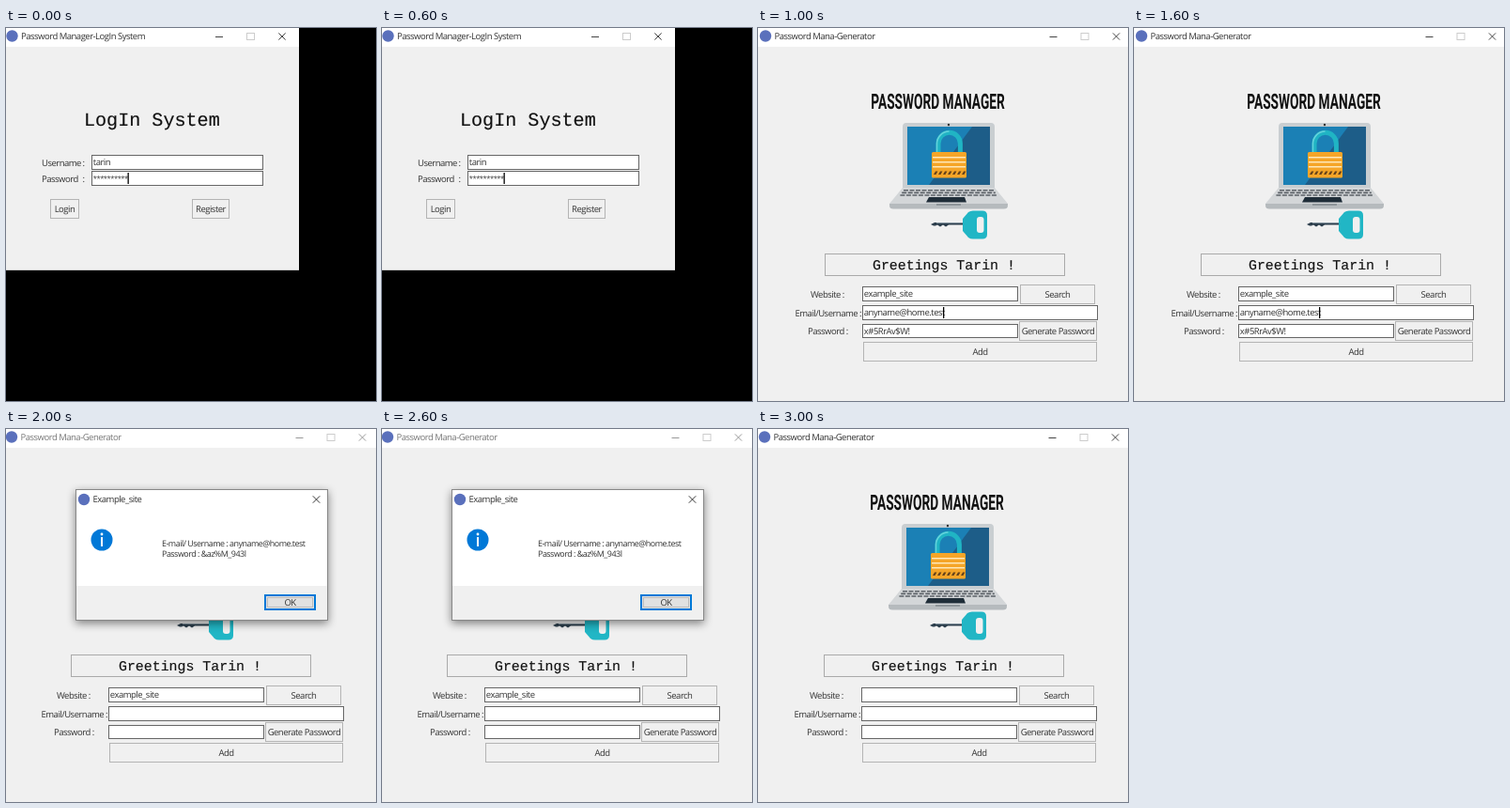
Animation, 394 px wide and 397 px high, one loop 4 s. Source, as an HTML page:

```html
<!DOCTYPE html>
<html lang="en">
<head>
<meta charset="utf-8">
<title>Password Manager</title>
<style>
html, body { margin: 0; height: 100%; overflow: hidden; background: #000; }
svg { display: block; width: 394px; height: 397px; }
text { font: 9.5px "Open Sans", "Noto Sans", sans-serif; letter-spacing: -.5px; fill: #333; white-space: pre; text-rendering: geometricPrecision; }
.mid { text-anchor: middle; }
.mono { font-family: "Liberation Mono", "Courier New", monospace; letter-spacing: 0; fill: #111; stroke: #111; stroke-width: .15; }
.heading { font: bold 22.5px Roboto, sans-serif; letter-spacing: 0; fill: #111; }
.note { font-size: 8.95px; }
.stars { font-size: 7.6px; }
.idle { fill: #777; }
</style>
</head>
<body>
<svg id="stage" viewBox="0 0 394 397"></svg>
<script>
const rect = (x, y, w, h, fill, more = "") =>
  `<rect x="${x}" y="${y}" width="${w}" height="${h}" fill="${fill}" ${more}/>`;
const path = (d, fill, more = "") => `<path d="${d}" fill="${fill}" ${more}/>`;
const circle = (x, y, r, fill) => `<circle cx="${x}" cy="${y}" r="${r}" fill="${fill}"/>`;
const text = (x, y, s, cls = "", more = "") =>
  `<text x="${x}" y="${y}" class="${cls}" ${more}>${s.replace(/&/g, "&amp;")}</text>`;
const box = (x, y, x2, y2, fill, line) =>
  rect(x + .5, y + .5, x2 - x - 1, y2 - y - 1, fill, `stroke="${line}"`);
const field = (x, y, x2, y2, s = "") =>
  box(x, y, x2, y2, "#fff", "#666") + text(x + 1.8, (y + y2) / 2 + 3.4, s);
const button = (x, y, x2, y2, s) =>
  box(x, y, x2, y2, "#f0f0f0", "#b4b4b4") + text((x + x2) / 2, (y + y2) / 2 + 3.6, s, "mid");
const cross = (x, y, r, color) =>
  path(`M${x - r} ${y - r}l${2 * r} ${2 * r}m0 ${-2 * r}l${-2 * r} ${2 * r}`, "none", `stroke="${color}"`);
const caret = (x, y) => rect(x, y, 1.3, 12, "#000");
const appIcon = (x, y) => circle(x, y, 6.2, "#5a70bc");

// Window background, title bar and its controls; right is the centre of the close cross
function frame(w, h, right, x, title, active = true) {
  const ink = active ? "#444" : "#999";
  return rect(0, 0, w, h, "#f0f0f0") + rect(0, 0, w, 20, "#fff") +
    appIcon(x - 9.5, 8.5) + text(x, 12.2, title, active ? "" : "idle") +
    rect(right - 71, 9, 8, 1, ink) + box(right - 38, 5, right - 29, 13, "none", "#ccc") +
    cross(right, 9, 3.6, ink);
}

function login() {
  return rect(0, 0, 394, 397, "#000") +
    frame(312, 258, 294, 16, "Password Manager-LogIn System") + rect(0, 257, 312, 1, "#ccc") +
    text(83, 104.3, "LogIn System", "mono", 'style="font-size:20.1px"') +
    text(38, 146.5, "Username") + text(81.5, 146.5, ":") + field(91, 135, 274, 151, "tarin") +
    text(38, 164, "Password") + text(81.5, 164, ":") + field(91, 152, 274, 168) +
    text(92.8, 163, "*".repeat(10), "stars") + caret(129.5, 154) +
    button(47, 182, 78, 203, "Login") + button(198, 182, 238, 203, "Register");
}

function laptop() {
  let s = path("M154 170V105q0-4 4-4h90q4 0 4 4v65z", "#c9ced1") +
    rect(159, 105, 88, 62, "#1b80b5") +
    path("M228 105h19v62h-65z", "#1d5d88") + circle(203, 103, 1.2, "#333") +
    path("M154 170h98l14 17H140z", "#d3d6d8");
  for (let i = 0; i < 3; i++)
    s += path(`M${155 - i * 1.8} ${172.8 + i * 2.6}H${251 + i * 1.8}`, "none",
      'stroke="#5c6268" stroke-width="1.6" stroke-dasharray="5 1.5"');
  s += path("M182 180h38l2 5.5h-43z", "#1f2d38") +
    path("M140 187h126v2q0 3.5-4 3.5H144q-4 0-4-3.5z", "#b5babd") + rect(190, 187, 26, 2, "#8e9599");
  // padlock
  s += path("M192 133v-10a11.7 11.7 0 0 1 23.4 0v10", "none", 'stroke="#20b4c4" stroke-width="5"') +
    path("M190.5 133v-10a13.2 13.2 0 0 1 13-13", "none", 'stroke="#65d2dc" stroke-width="1.5"') +
    rect(185, 132, 37, 27.5, "#f5a528", 'rx="1.5"');
  for (const y of [137, 142, 147]) s += rect(186, y, 35, 1.5, "#ffe8b8");
  for (let x = 187; x < 220; x += 5) s += path(`M${x} 156l2-3.5h2.5l-2 3.5z`, "#65421c");
  return s;
}

const key = () =>
  path("M219 207h-31l-4 2 3 1.5h2l2-1 3 2 3-2 3 2 3-2h16z", "#2c3e4c") + rect(190, 207, 28, 1, "#80909b") +
  path("M218 203l6-7q2-1.5 5-1.5h10q5 0 5 5v20q0 5-5 5h-10q-3 0-5-1.5l-6-7z", "#21b6c5") +
  rect(233, 201, 7.5, 17, "#f0f0f0", 'rx="3"');

function manager(dx, site = "", mail = "", pass = "", active = true) {
  return rect(0, 0, 394, 397, "#f0f0f0") + rect(0, 0, 394, 20, "#fff") +
    `<g transform="translate(${dx})">` + frame(394, 397, 381.5, 17.5, "Password Mana-Generator", active) +
    text(0, 0, "PASSWORD MANAGER", "heading mid", 'transform="translate(191.5 85.5) scale(.61 1)"') +
    laptop() + key() + box(71, 240, 327, 264, "#f0f0f0", "#aaa") +
    text(122, 257, "Greetings Tarin !", "mono", 'style="font-size:14.9px"') +
    text(56, 286.7, "Website :") + field(111, 275, 277, 291, site) + button(279, 273, 359, 294, "Search") +
    text(39.5, 306.7, "Email/Username :") + field(111, 295, 362, 311, mail) +
    text(53, 326, "Password :") + field(111, 315, 277, 330, pass) +
    button(278, 312, 361, 333, "Generate Password") + button(112, 334, 361, 355, "Add") + "</g>";
}

function dialog() {
  return `<g style="filter:drop-shadow(0 3px 5px #0007)">${rect(74, 64, 269, 140, "#fff")}</g>` +
    box(74, 64, 343, 204, "#fff", "#888") + rect(75, 167, 267, 36, "#f0f0f0") +
    appIcon(83, 75) + text(92.5, 78.3, "Example_site") + cross(330.5, 75, 3.7, "#333") +
    circle(102, 118, 11.5, "#0078d7") + circle(102, 112, 1.4, "#fff") + rect(101, 115, 2, 10, "#fff") +
    text(166, 125, "E-mail/ Username : anyname@home.test", "note") +
    text(166, 136, "Password : &az%M_943l", "note") +
    rect(276, 177, 53, 15, "#e1e1e1", 'stroke="#0078d7" stroke-width="2"') +
    rect(278.5, 179.5, 48, 10, "none", 'stroke="#666" stroke-width=".6" stroke-dasharray="1 1"') +
    text(302.5, 188, "OK", "mid");
}

const scenes = [
  login(),
  manager(0, "example_site", "anyname@home.test", "x#5RrAv$W!") + caret(197, 297),
  manager(-2, "example_site", "", "", false) + dialog(),
  manager(-1)
];
const stage = document.getElementById("stage");
stage.innerHTML = scenes.map(s => `<g>${s}</g>`).join("");
const groups = [...stage.children];

function draw(now) {
  const shown = Math.floor(now % 4000 / 1000);
  groups.forEach((g, i) => g.style.display = i === shown ? "" : "none");
  requestAnimationFrame(draw);
}
draw(performance.now());
</script>
</body>
</html>
```
